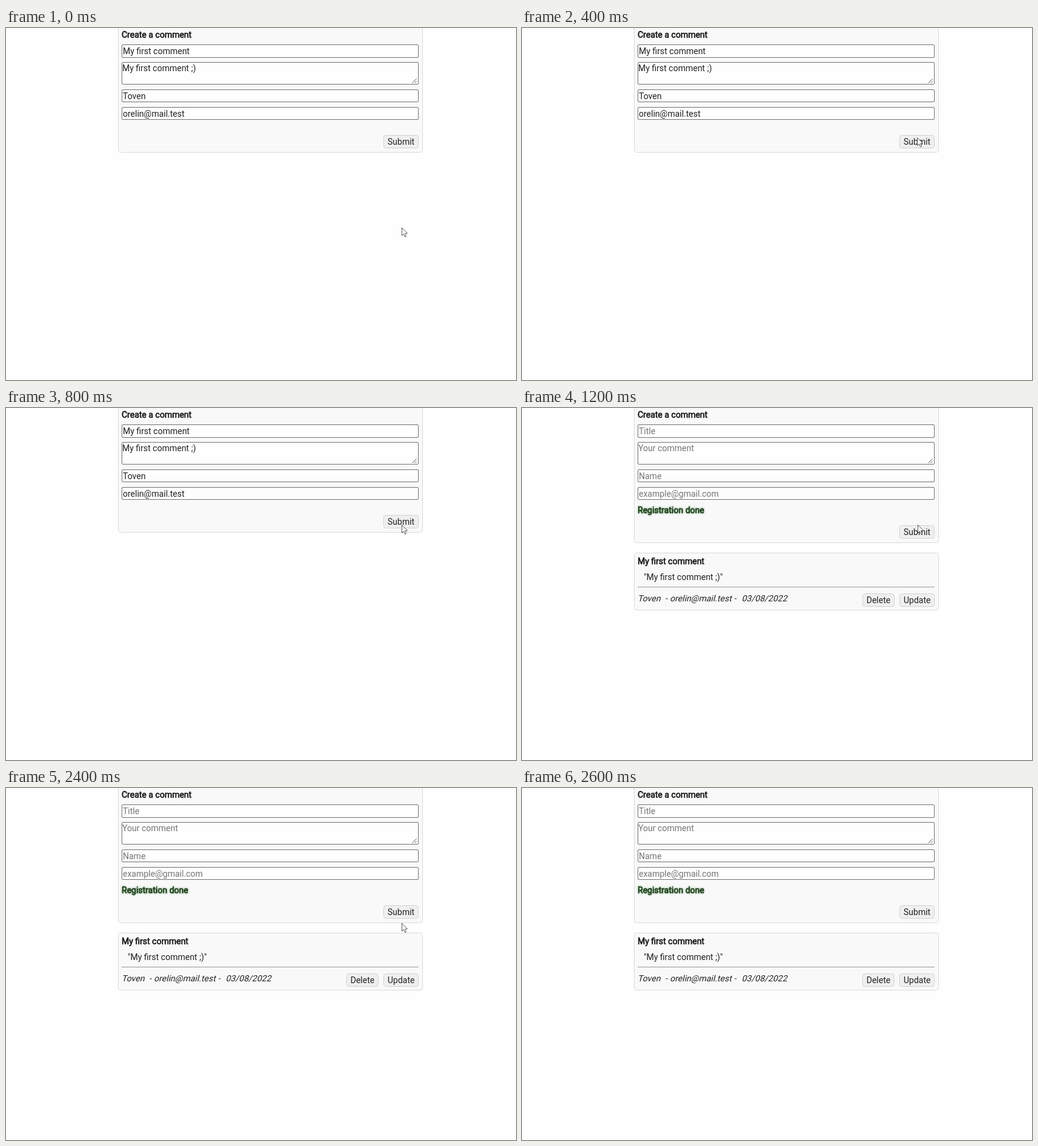
Animation, 838 px wide and 579 px high, one loop 3300 ms. Source, as an HTML page with a canvas:

```html
<!DOCTYPE html>
<html lang="en">
<head>
<meta charset="utf-8">
<title>Comment form</title>
<style>
  html, body { margin: 0; width: 100%; height: 100%; overflow: hidden; background: #fefefe; }
  canvas { display: block; }
</style>
</head>
<body>
<canvas id="stage" width="838" height="579"></canvas>
<script>
const ctx = document.getElementById('stage').getContext('2d');
const LOOP = 3300;
const TICK = 100;
const INK = '#222';
const HINT = '#757575';
const AUTHOR = 'Toven';
const EMAIL = 'orelin@mail.test';

function box(x, y, w, h, radius, fill, border) {
  ctx.beginPath();
  ctx.roundRect(x + 0.5, y + 0.5, w - 1, h - 1, radius);
  ctx.fillStyle = fill;
  ctx.fill();
  ctx.lineWidth = 1;
  ctx.strokeStyle = border;
  ctx.stroke();
}

function text(str, x, y, color = INK) {
  ctx.fillStyle = color;
  ctx.fillText(str, x, y);
}

function boldText(str, x, y, color = '#111') {
  text(str, x, y, color);
  ctx.lineWidth = 0.55;
  ctx.strokeStyle = color;
  ctx.strokeText(str, x, y);
}

function obliqueText(str, x, y) {
  ctx.save();
  ctx.transform(1, 0, -0.25, 1, x, y);
  text(str, 0, 0);
  ctx.restore();
}

function card(y, h) {
  box(184, y, 501, h, 4, '#f9f9f9', '#dadada');
}

function field(y, h, value, hint, textX = 192, baseline = y + 16) {
  box(190, y, 488, h, 1.5, '#fefefe', '#727272');
  text(value || hint, textX, baseline, value ? INK : HINT);
}

function button(label, right, y) {
  const w = Math.round(ctx.measureText(label).width + 14);
  box(right - w, y, w, 22, 4, '#efefef', '#d3d3d3');
  text(label, right - w + 7, y + 16);
}

function resizeGrip() {
  ctx.beginPath();
  ctx.moveTo(667.5, 90.5);
  ctx.lineTo(674.5, 83.5);
  ctx.moveTo(671.5, 90.5);
  ctx.lineTo(674.5, 87.5);
  ctx.lineWidth = 1;
  ctx.strokeStyle = '#555';
  ctx.stroke();
}

function form(filled, done, label) {
  const shift = done ? 17 : 0;
  const value = str => filled ? str : '';
  card(-12, 217 + shift);
  boldText('Create a comment', 190, 16);
  field(27, 22, value('My first comment'), 'Title');
  field(56, 37, value('My first comment ;)'), 'Your comment', 191, 71);
  resizeGrip();
  field(101, 21, value(AUTHOR), 'Name');
  field(130, 21, value(EMAIL), 'example@gmail.com');
  if (done) {
    ctx.save();
    ctx.shadowColor = 'rgba(0, 128, 0, 0.55)';
    ctx.shadowBlur = 3;
    boldText('Registration done', 190, 173, '#222e20');
    ctx.restore();
  }
  button(label, 678, 176 + shift);
}

function postedComment() {
  card(238, 95);
  boldText('My first comment', 190, 257);
  text('"My first comment ;)"', 200, 283);
  ctx.fillStyle = '#999';
  ctx.fillRect(190, 294, 488, 1);
  obliqueText(AUTHOR, 190, 318);
  obliqueText('-', 235, 318);
  obliqueText(EMAIL, 243, 318);
  obliqueText('-', 348, 318);
  obliqueText('03/08/2022', 361, 318);
  button('Delete', 612, 305);
  button('Update', 678, 305);
}

function cursorAt(t) {
  if (t < 800) {
    const p = Math.min(t / 400, 1);
    const eased = p * p * (3 - 2 * p);
    return [650 - eased, 328 - 148 * eased];
  }
  if (t < 2400) return [650, 192];
  if (t < 2500) return [650, 222];
  if (t < 2600) return [650, 535];
  return null;
}

function cursor(x, y) {
  ctx.save();
  ctx.translate(Math.round(x) + 0.5, Math.round(y) + 0.5);
  ctx.beginPath();
  ctx.moveTo(0, 0);
  for (const [px, py] of [[0, 13], [3, 10.3], [5, 15], [7, 14.2], [5.1, 9.5], [9, 9.2]]) {
    ctx.lineTo(px, py);
  }
  ctx.closePath();
  ctx.fillStyle = '#fff';
  ctx.fill();
  ctx.lineWidth = 0.8;
  ctx.strokeStyle = '#333';
  ctx.stroke();
  ctx.restore();
}

function draw(now) {
  const t = Math.floor((now % LOOP) / TICK) * TICK;
  const done = t >= 1200;
  ctx.fillStyle = '#fefefe';
  ctx.fillRect(0, 0, 838, 579);
  ctx.font = '14px Roboto, sans-serif';
  form(t < 1100, done, t === 1100 ? 'Loading ...' : 'Submit');
  if (done) postedComment();
  const tip = cursorAt(t);
  if (tip) cursor(...tip);
}

const start = performance.now();
function frame() {
  draw(performance.now() - start);
  requestAnimationFrame(frame);
}
frame();
</script>
</body>
</html>
```
